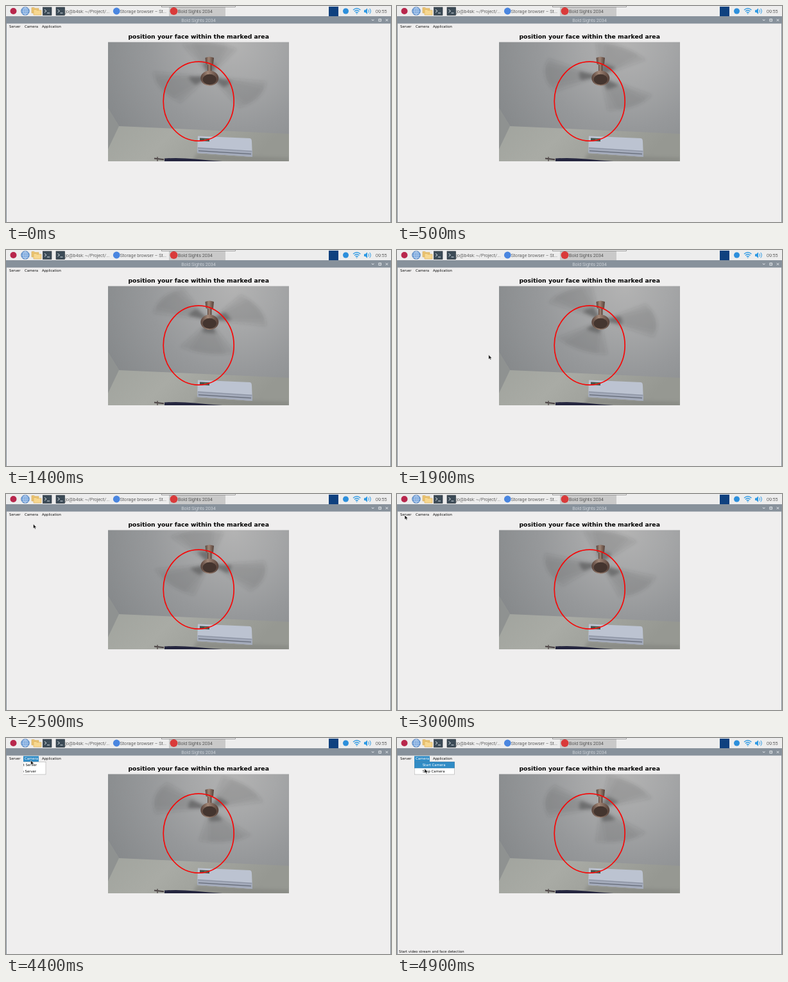
An HTML page for the animation above (5 s loop, 600 by 338 pixels).

```html
<!DOCTYPE html>
<html lang="en">
<head>
<meta charset="utf-8">
<title>Camera window</title>
<style>
  html, body { margin: 0; width: 100%; height: 100%; overflow: hidden; background: #efeeee; }
  svg { display: block; width: 100vw; height: 100vh; }
  text { white-space: pre; }
  .bar { font: 300 7.25px Roboto, sans-serif; fill: #222; }
  .ui { font: 5.35px "DejaVu Sans", sans-serif; fill: #111; }
  .on { fill: #fff; }
  .head { font: bold 9.25px "DejaVu Sans", sans-serif; fill: #000; }
</style>
</head>
<body>
<svg viewBox="0 0 600 338" preserveAspectRatio="none">
  <defs>
    <radialGradient id="ceiling" gradientUnits="userSpaceOnUse" cx="355" cy="58" r="225">
      <stop offset="0" stop-color="#b3b3b3"/>
      <stop offset=".3" stop-color="#a6a7a8"/>
      <stop offset=".6" stop-color="#96989a"/>
      <stop offset="1" stop-color="#86898b"/>
    </radialGradient>
    <linearGradient id="wall" x1="0" y1="0" x2="1" y2=".3">
      <stop offset="0" stop-color="#9fa29c"/>
      <stop offset=".45" stop-color="#a9aba5"/>
      <stop offset="1" stop-color="#969892"/>
    </linearGradient>
    <linearGradient id="metal">
      <stop offset="0" stop-color="#57423a"/>
      <stop offset=".4" stop-color="#a18676"/>
      <stop offset="1" stop-color="#543f37"/>
    </linearGradient>
    <filter id="soft" x="-20%" y="-20%" width="140%" height="140%">
      <feGaussianBlur stdDeviation="2.4"/>
    </filter>
    <clipPath id="photo"><rect x="159" y="56.5" width="282" height="186.5"/></clipPath>
    <clipPath id="menuClip"><rect id="menuCut" x="0" y="36" width="100" height="24"/></clipPath>
  </defs>

  <rect width="600" height="338" fill="#efeeee"/>

  <!-- Taskbar -->
  <rect width="600" height="16" fill="#ededed"/>
  <rect x="254" width="88" height="16" fill="#c9c9c9"/>
  <rect x="242.5" y="-2" width="115" height="3.4" fill="#fafafa" stroke="#777" stroke-width=".7"/>
  <circle cx="11.5" cy="8" r="5" fill="#b8274c"/>
  <g fill="none" stroke="#d5e5f8" stroke-width=".8">
    <circle cx="30" cy="8" r="6.3" fill="#5d92d2" stroke="#4778b5"/>
    <ellipse cx="30" cy="8" rx="2.9" ry="6"/>
    <path d="M24 8H36M30 2V14M25.2 4.8H34.8M25.2 11.2H34.8"/>
  </g>
  <g stroke="#d9ae55" stroke-width=".6">
    <path d="M40 2.5h4l1 1.2h6V11H40z" fill="#eac373"/>
    <path d="M43 5.5h4l1 1.2h7V14H43z" fill="#f7d890"/>
  </g>
  <g id="terms"></g>
  <circle cx="172.3" cy="8" r="5.4" fill="#4a86e0"/>
  <circle cx="261.5" cy="8" r="6" fill="#d93a3a"/>
  <text class="bar" x="92.2" y="11">jo@b4sk: ~/Project/...</text>
  <text class="bar" x="177.8" y="11">Storage browser – St...</text>
  <text class="bar" x="268" y="11">Bold Sights 2034</text>
  <rect x="503" y="1" width="15" height="15" fill="#0f417f"/>
  <circle cx="529.5" cy="8" r="4.5" fill="#2c8fdc"/>
  <g fill="none" stroke="#2f9ae4" stroke-width="1.4">
    <path d="M541 6.2Q546.7 1.2 552.4 6.2M542.9 8.5Q546.7 5 550.5 8.5M544.8 10.7Q546.7 9 548.6 10.7"/>
    <circle cx="546.7" cy="12.3" r=".7" fill="#2f9ae4" stroke="none"/>
    <path d="M558 6.2h2l3-2.8v9.4l-3-2.8h-2z" fill="#2f9ae4" stroke="none"/>
    <path d="M564.6 5.6Q566.6 8 564.6 10.6M566.7 4Q570 8 566.7 12.2" stroke-width="1"/>
  </g>
  <text class="bar" x="576" y="11">09:55</text>

  <!-- Window frame -->
  <rect y="16" width="600" height="11.5" fill="#87919b"/>
  <text class="bar" x="300" y="24.7" text-anchor="middle" style="fill:#e9edf1">Bold Sights 2034</text>
  <g fill="none" stroke="#eef1f4" stroke-width=".9">
    <path d="M570 21l1.7 2 1.7-2M591.8 20.4l3.4 3.4M595.2 20.4l-3.4 3.4"/>
    <rect x="581" y="20.4" width="3.4" height="3.4"/>
  </g>
  <path d="M.5 27V338M599.5 27V338" stroke="#87919b"/>
  <text class="head" x="300.2" y="51" text-anchor="middle">position your face within the marked area</text>

  <!-- Camera picture -->
  <g clip-path="url(#photo)">
    <rect x="159" y="56" width="282" height="188" fill="url(#ceiling)"/>
    <path d="M159 160L176 188L441 200V244H159z" fill="url(#wall)"/>
    <path d="M159 160L176 188L159 224z" fill="#8f9291"/>
    <path d="M298 230L384 236L441 238V244H290z" fill="#73756f" opacity=".4" filter="url(#soft)"/>
    <path d="M299 203.5L380 207Q383 207.5 383 212L384 236L298 230z" fill="#bcc3d1"/>
    <path d="M298.6 221L383.5 226.5L384 236L298 230z" fill="#a3aaba"/>
    <path d="M299 222L383.5 227.3" stroke="#858c9b" stroke-width=".9"/>
    <path d="M300 226.6L382 231.7" stroke="#636976" stroke-width="1.3"/>
    <path d="M302 206.5l15 .8v4.6l-15-1z" fill="#48534c"/>
    <path d="M309 208l5 .3v2l-5-.3z" fill="#4f8a5c"/>
    <path d="M231 238.5L246 240.3" stroke="#4a4243" stroke-width="2"/>
    <path d="M236 236v7" stroke="#57504f" stroke-width="1.5"/>
    <path d="M247 238.5Q270 237 295 239.5T346 243.5H247z" fill="#25263f"/>
    <g filter="url(#soft)"><g id="blades"></g></g>
    <g fill="url(#metal)">
      <path d="M310.5 81Q317 78 324 81L323 91Q317 95 311.5 91z"/>
      <path d="M314 92h6.5v12H314z"/>
      <ellipse cx="317.3" cy="113" rx="14" ry="11.7"/>
    </g>
    <ellipse cx="317.3" cy="115" rx="10.8" ry="8.2" fill="#44352f"/>
  </g>
  <ellipse cx="300.2" cy="149.2" rx="55" ry="62" fill="none" stroke="#f60808" stroke-width="1.7"/>

  <!-- Menus -->
  <g id="menus"></g>
  <text class="ui" id="status" x="3" y="336">Start video stream and face detection</text>
  <path id="cursor" d="M0 0V7L1.6 5.6L2.7 8L3.9 7.5L2.9 5.2H5z" fill="#111" stroke="#fff" stroke-width=".5"/>
</svg>
<script>
const LOOP = 5000, STEP = 100;
const BLUE = '#308cc6';
const el = id => document.getElementById(id);
const box = (x, y, w, h, attrs) => `<rect x="${x}" y="${y}" width="${w}" height="${h}" ${attrs}/>`;
const label = (x, y, s, on) => `<text class="ui${on ? ' on' : ''}" x="${x}" y="${y}">${s}</text>`;

// [time, value, ...] keys, joined by straight lines
const spin = [[0, 30], [900, 73], [1900, 112], [2500, 135], [3600, 193], [4400, 192], [4900, 186]];
const pointer = [
  [1900, 142.8, 164], [2500, 42.5, 47], [2800, 5, 21], [3000, 12, 33], [3600, 12.6, 34.2],
  [4200, 14, 34.4], [4400, 38.6, 35], [4900, 43, 48]
];

function track(keys, t) {
  if (t <= keys[0][0]) return keys[0].slice(1);
  for (let i = 1; i < keys.length; i++) {
    const a = keys[i - 1], b = keys[i];
    if (t <= b[0]) {
      const k = (t - a[0]) / (b[0] - a[0]);
      return a.slice(1).map((v, n) => v + (b[n + 1] - v) * k);
    }
  }
  return keys[keys.length - 1].slice(1);
}

// Pie slice around the positive x axis, in units of the fan radius
function wedge(half, r, alpha) {
  const a = half * Math.PI / 180, x = r * Math.cos(a), y = r * Math.sin(a);
  return `<path d="M0 0L${x} ${-y}A${r} ${r} 0 0 1 ${x} ${y}z" fill="#3c3b3c" fill-opacity="${alpha}"/>`;
}

const blade = wedge(29, 1, .1) + wedge(19, .97, .08) + wedge(20, .38, .42);

// The fan disc is seen from below and leans down to the right
function drawBlades(angle) {
  el('blades').innerHTML = [0, 120, 240].map(a =>
    `<g transform="translate(317.5 110) skewY(5) scale(88 53) rotate(${angle + a})">${blade}</g>`).join('');
}

function popup(x, w, name, hover) {
  return box(x, 37.3, w, 19.7, 'fill="#fff" stroke="#aaa" stroke-width=".6"') +
    (hover ? box(x, 37.3, w, 9.7, `fill="${BLUE}" stroke="#2a73a3" stroke-width=".5"`) : '') +
    label(x + 12.5, 44.2, 'Start ' + name, hover) +
    label(x + 12.5, 54.2, 'Stop ' + name);
}

function drawMenus(t) {
  const server = t >= 3300 && t < 4400, camera = t >= 4400;
  let s = '';
  if (server) s += box(3, 28.3, 20.3, 9, `fill="${BLUE}"`);
  if (camera) s += box(27, 28.3, 24, 9, `fill="${BLUE}"`);
  s += label(5, 34.4, 'Server', server) + label(29, 34.4, 'Camera', camera) +
    label(56, 34.4, 'Application');
  // The old list stays for a moment under the newly opened one
  if (server || camera) {
    const fresh = t >= 4500;
    s += `<g clip-path="url(#menuClip)">${
      fresh ? popup(27.2, 62.4, 'Camera', t >= 4900) : popup(3.2, 58.8, 'Server')}</g>`;
  }
  el('menuCut').setAttribute('x', camera ? 26.9 : 0);
  el('menus').innerHTML = s;
}

function draw(t) {
  drawBlades(track(spin, t)[0]);
  drawMenus(t);
  const [x, y] = track(pointer, t);
  el('cursor').setAttribute('transform', `translate(${x} ${y})`);
  el('cursor').style.display = t < 1900 ? 'none' : '';
  el('status').style.display = t < 4900 ? 'none' : '';
}

el('terms').innerHTML = [57.5, 78].map(x =>
  box(x, 2, 13.5, 12.5, 'fill="#3c4b57" stroke="#222b33" stroke-width=".6"') +
  `<path d="M${x + 2.5} 5.5l3 2.3-3 2.3M${x + 6.5} 11h4" fill="none" stroke="#d5dde3" stroke-width="1"/>`).join('');

const start = performance.now();
let last = -1;
function tick() {
  const t = Math.floor((performance.now() - start) % LOOP / STEP) * STEP;
  if (t !== last) draw(last = t);
  requestAnimationFrame(tick);
}
tick();
</script>
</body>
</html>
```
